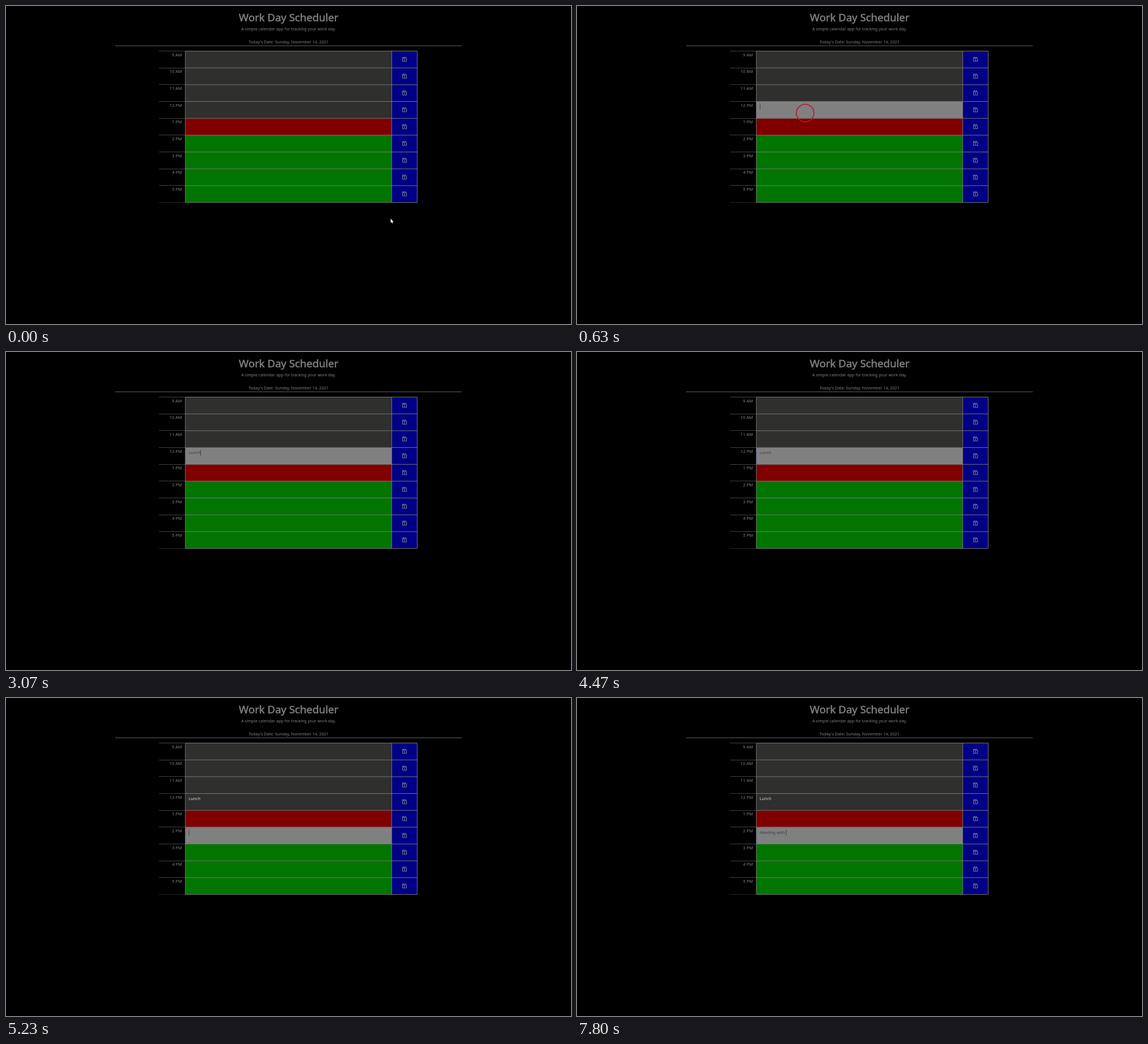
Animation of 998x561 px, one loop 8000 ms. Source, as an HTML page:

```html
<!DOCTYPE html>
<html lang="en">
<head>
<meta charset="utf-8">
<title>Work Day Scheduler</title>
<style>
  html, body { margin: 0; width: 100%; height: 100%; overflow: hidden; background: #000; }
  svg { display: block; font: 7.2px "Noto Sans", "Open Sans", sans-serif; fill: #808080; }
  .title { font-size: 18.6px; stroke: #808080; stroke-width: .5; }
  .mid { text-anchor: middle; }
  .hour { font-size: 7.6px; text-anchor: end; }
  .line { fill: none; stroke: #808080; stroke-width: .9; }
  .dots { stroke: #777; stroke-dasharray: 1.2 1; }
  .icon { fill: none; stroke: #909098; stroke-width: .9; }
</style>
</head>
<body>
<svg id="stage" width="998" height="561" viewBox="0 0 998 561">
  <text class="title mid" x="499.2" y="26.7">Work Day Scheduler</text>
  <text class="mid" x="499" y="43.2">A simple calendar app for tracking your work day.</text>
  <text class="mid" x="499" y="66.2">Today's Date: Sunday, November 14, 2021</text>
  <rect x="193" y="69.2" width="612" height="2" fill="#35353a"/>
  <g id="rows"></g>
  <rect id="caret" width="0.8" height="10.5" fill="#333"/>
  <circle id="ring" fill="none" stroke="#b81c2e" stroke-width="1.7"/>
  <path id="arrow" d="M0 0V7.6L1.7 6.1L2.9 8.8L4 8.3L2.9 5.7H5.1Z" fill="#fff"/>
</svg>
<script>
const LOOP = 8000, TOP = 79.5, PITCH = 29.68, LEFT = 316.8, TEXT_X = 322.8;
const HOURS = ["9 AM", "10 AM", "11 AM", "12 PM", "1 PM", "2 PM", "3 PM", "4 PM", "5 PM"];
const $ = id => document.getElementById(id);
const rowTop = i => TOP + PITCH * i;
const clamp = v => Math.max(0, Math.min(1, v));
const baseColor = i => i < 4 ? "#2f2f2d" : i === 4 ? "#800000" : "#007600";
const set = (el, attrs) => { for (const k in attrs) el.setAttribute(k, attrs[k]); };

// Each visit to a row: click time and place, then the time of every typed character.
const visits = [
  { row: 3, start: 630, end: 4830, x: 403, y: 188.8, text: "Lunch",
    keys: [1630, 1830, 2030, 2170, 2830] },
  { row: 5, start: 4830, end: LOOP, x: 368.5, y: 245.3, text: "Meeting with ",
    keys: [6030, 6300, 6470, 6500, 6530, 6700, 6830, 7000, 7270, 7370, 7430, 7530, 7800] }
];

const fillMarkup = (_, i) => `
  <rect id="box${i}" x="${LEFT}" y="${rowTop(i)}" width="364.4" height="${PITCH}" fill="${baseColor(i)}"/>`;

function rowMarkup(hour, i) {
  const y = rowTop(i);
  return `
    <path class="dots" d="M271 ${Math.floor(y) + .5}H316"/>
    <text class="hour" x="311" y="${y + 9}">${hour}</text>
    <path class="line" d="M${LEFT} ${y}H726"/>
    <g class="icon" transform="translate(704 ${y + 14.6})">
      <path d="M-3.6 -3.6H2L3.6 -2V3.6H-3.6ZM-2 -3.6V-1.4H1.4V-3.6"/>
      <circle cy="1.2" r=".7"/>
    </g>
    <path id="glow${i}" class="line" style="stroke:#46658f" opacity="0" d="M681 ${y}H${LEFT}v${PITCH}"/>
    <text id="note${i}" x="${TEXT_X}" y="${y + 11.9}" xml:space="preserve"></text>`;
}

const bottom = rowTop(HOURS.length);
$("rows").innerHTML = HOURS.map(fillMarkup).join("") +
  `<rect x="681" y="${TOP}" width="45.4" height="${bottom - TOP}" fill="#000084"/>
   <path class="line" d="M${LEFT} ${TOP}V${bottom}H726.3V${TOP}M681.3 ${TOP}V${bottom}"/>
   <path class="dots" opacity=".6" d="M271 346.5H316"/>` +
  HOURS.map(rowMarkup).join("");

function drawVisit(v, t) {
  const focused = t >= v.start && t < v.end;
  const typed = v.keys.filter(k => k <= t).length;
  const note = $("note" + v.row);
  note.textContent = v.text.slice(0, typed);
  note.setAttribute("fill", focused ? "#3c3c3c" : "#d8d8d8");
  $("box" + v.row).setAttribute("fill", focused ? "#808080" : baseColor(v.row));
  $("glow" + v.row).setAttribute("opacity", clamp((t - v.start) / 150) * (1 - clamp((t - v.end) / 150)));
  if (!focused) return;

  const since = t - (typed ? v.keys[typed - 1] : v.start);
  set($("caret"), {
    x: TEXT_X + (typed ? note.getComputedTextLength() : 0),
    y: rowTop(v.row) + 4,
    opacity: since % 1070 < 535 ? 1 : 0
  });
  const p = clamp((t - v.start) / 320);
  set($("ring"), { cx: v.x, cy: v.y, r: 15.5 + 4.5 * p, opacity: 1 - p });
}

function draw(t) {
  set($("caret"), { opacity: 0 });
  set($("ring"), { opacity: 0 });
  for (const v of visits) drawVisit(v, t);

  // The pointer shows only outside the schedule.
  const p = clamp((t - 30) / 550), e = p * p * (3 - 2 * p);
  const x = 679.5 + (403 - 679.5) * e, y = 375 + (188.8 - 375) * e;
  set($("arrow"), { transform: `translate(${x} ${y})`, opacity: y > 346 ? 1 : 0 });
}

const begin = performance.now();
function tick() {
  draw((performance.now() - begin) % LOOP);
  requestAnimationFrame(tick);
}
tick();
</script>
</body>
</html>
```
